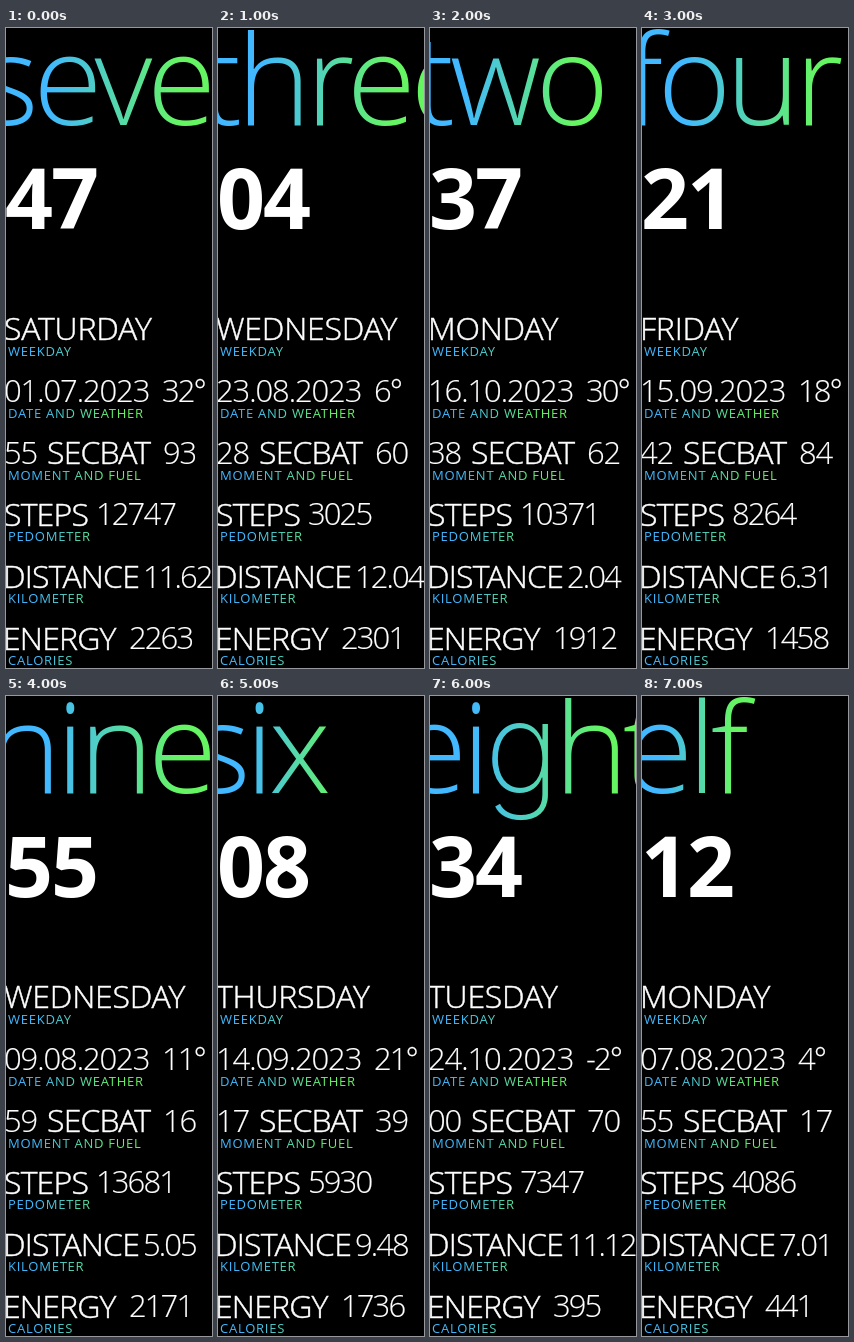
Animation of 206 by 640 pixels, one loop 8 s. Source, as an HTML page:

```html
<!DOCTYPE html>
<html lang="en">
<head>
<meta charset="utf-8">
<style>
  html, body { margin: 0; height: 100%; overflow: hidden; background: #000; }
  svg { display: block; }
  text { font-family: "Open Sans", "Noto Sans", sans-serif; fill: #fff; white-space: pre; }
  .hour { font-size: 126px; font-weight: 300; fill: url(#hourFade); letter-spacing: -5.4px; }
  .hour .g { font-family: Inter, sans-serif; font-weight: 200; }
  .big { font-size: 84px; font-weight: 700; letter-spacing: -2px; }
  .head, .day { font-size: 32px; font-weight: 300; letter-spacing: -.8px; stroke: #fff; stroke-width: .5px; }
  .day { letter-spacing: -.2px; }
  .num, .date { font-size: 31px; font-weight: 300; letter-spacing: -1.9px; stroke: #fff; stroke-width: .2px; }
  .date { letter-spacing: -1.1px; }
  .label { font-size: 13px; fill: url(#labelFade); letter-spacing: .75px; }
</style>
</head>
<body>
<svg width="206" height="640">
  <defs>
    <linearGradient id="hourFade" gradientUnits="userSpaceOnUse" x1="0" x2="206">
      <stop offset=".2" stop-color="#41b8ff"/><stop offset=".85" stop-color="#66f562"/>
    </linearGradient>
    <linearGradient id="labelFade" gradientUnits="userSpaceOnUse" x1="0" x2="140">
      <stop offset=".2" stop-color="#41b8ff"/><stop offset=".8" stop-color="#66f562"/>
    </linearGradient>
  </defs>
</svg>
<script>
const svg = document.querySelector("svg");
const fade = document.getElementById("hourFade");

function addText(cls, x, y, content = "") {
  const el = document.createElementNS("http://www.w3.org/2000/svg", "text");
  el.setAttribute("class", cls);
  el.setAttribute("x", x);
  el.setAttribute("y", y);
  el.textContent = content;
  return svg.appendChild(el);
}

["WEEKDAY", "DATE AND WEATHER", "MOMENT AND FUEL", "PEDOMETER", "KILOMETER", "CALORIES"]
  .forEach((label, i) => addText("label", 2, 328 + Math.round(i * 61.8), label));
addText("head", 41, 436, "SECBAT");
addText("head", -2, 498, "STEPS");
addText("head", -3, 560, "DISTANCE");
addText("head", -3, 622, "ENERGY");

const hour = addText("hour", 0, 97);
const fields = [
  ["big", -1, 201], ["day", -2, 312], ["date", -2, 374], ["num", 156, 374], ["date", -2, 436],
  ["date", 157, 436], ["num", 90, 497], ["num", 137, 560], ["num", 123, 621]
].map(f => addText(...f));

// hour word, its left edge and visible right edge, then one value per field
const states = [
  ["seven", -26, 206, "47", "SATURDAY", "01.07.2023", "32°", "55", "93", "12747", "11.62", "2263"],
  ["three", -18, 206, "04", "WEDNESDAY", "23.08.2023", "6°", "28", "60", "3025", "12.04", "2301"],
  ["two", -17, 168, "37", "MONDAY", "16.10.2023", "30°", "38", "62", "10371", "2.04", "1912"],
  ["four", -17, 206, "21", "FRIDAY", "15.09.2023", "18°", "42", "84", "8264", "6.31", "1458"],
  ["nine", -19, 206, "55", "WEDNESDAY", "09.08.2023", "11°", "59", "16", "13681", "5.05", "2171"],
  ["six", -26, 140, "08", "THURSDAY", "14.09.2023", "21°", "17", "39", "5930", "9.48", "1736"],
  ["eight", -32, 206, "34", "TUESDAY", "24.10.2023", "-2°", "00", "70", "7347", "11.12", "395"],
  ["elf", -18, 108, "12", "MONDAY", "07.08.2023", "4°", "55", "17", "4086", "7.01", "441"]
];

let shown = -1;
function draw() {
  const index = Math.floor(performance.now() / 1000) % states.length;
  if (index !== shown) {
    shown = index;
    const [word, left, right, ...values] = states[index];
    hour.innerHTML = word.replace("g", '<tspan class="g">g</tspan>');
    hour.setAttribute("x", left);
    fade.setAttribute("x2", right);
    fields.forEach((field, i) => field.textContent = values[i]);
  }
  requestAnimationFrame(draw);
}
draw();
</script>
</body>
</html>
```
